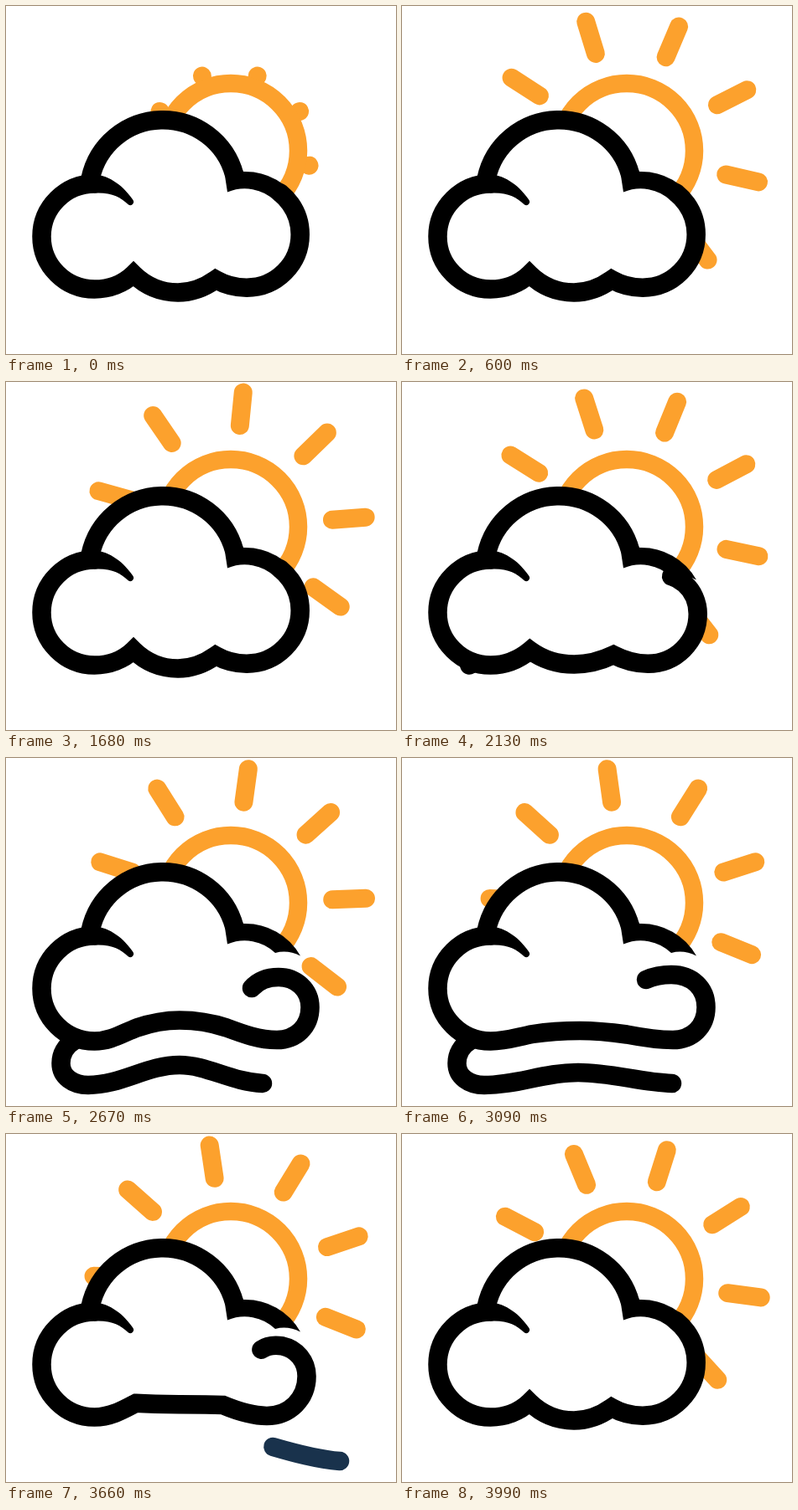
These frames come from a looping animation (465 by 416 pixels, 4.02 s). An HTML page:

```html
<!DOCTYPE html>
<html lang="en">
<head>
<meta charset="utf-8">
<title>Sun, cloud and wind</title>
<style>
html, body { margin: 0; height: 100%; overflow: hidden; background: #fff; }
svg { display: block; width: 465px; height: 416px; }
</style>
</head>
<body>
<svg viewBox="0 0 465 416" fill="none">
  <g stroke="#fca12d">
    <g id="rays" stroke-width="22" stroke-linecap="round"></g>
    <circle cx="268" cy="173" r="80.5" stroke-width="21.5"/>
  </g>
  <g fill="#fff">
    <circle cx="187" cy="224.5" r="88"/>
    <circle cx="287" cy="273" r="66"/>
    <path d="M150 250H300V360H150"/>
  </g>
  <path id="gust" pathLength="1" stroke-width="22.5" stroke-linecap="round"/>
  <path id="body" fill="#fff" stroke="#000" stroke-width="22.5" stroke-linecap="round" stroke-miterlimit="10"/>
  <path d="M100.7 206.2A88.2 88.2 0 0 1 272.2 201.7" stroke="#000" stroke-width="22.6"/>
  <g fill="#000">
    <path d="M264 222.5L261 203L281.5 195L283 198A75 75 0 0 1 351 236.5Q336 229 321 233A52.5 52.5 0 0 0 264 222.5"/>
    <path d="M105 201.2C124 202.5 141 216 151.5 232A4 4 0 0 1 146 237.5C136 228 126 222.5 105 223.5"/>
  </g>
</svg>
<script>
const LOOP = 4020;
const $ = id => document.getElementById(id);
const rays = $('rays'), body = $('body'), gust = $('gust');

// Lower outline of the cloud: puffy, wavy and nearly flat
const puffy = 'M327 223.4C331.6 227.1 335.8 231.6 339.2 236.5C346.7 247.1 350.7 260 350.7 273' +
  'C350.7 308.2 322.2 336.7 287 336.7C273 336.7 260.5 333 250 327' +
  'C236.7 336.5 221.3 342.5 205 342.5C185 342.5 166.4 334.5 152 320.5' +
  'C140 332 123 338.5 105.5 338.5';
const wavy = 'M293 275C301 266 312 262 325 262C346 262 362.5 277 362.5 298' +
  'C362.5 321 346 337 323 337C302 337 283 330 263 322.5' +
  'C245 316.5 230 313.5 207 313.5C187 313.5 172 317 156 322.5' +
  'C139 329 125 338.5 105.5 338.5';
const flat = 'M291 265C300 261 309 259 321 259C346 259 362.5 275 362.5 298' +
  'C362.5 321 346 337 323 337C304 337 286 334 268 330.5' +
  'C250 328 232 326 212 326C190 326 172 327.5 156 330' +
  'C139 333 125 338.5 105.5 338.5';
const leftPuff = 'A63 63 0 0 1 105.5 212.5';

// Gust of wind below the cloud
const hook = 'M81 338C71 344 65.5 354 65.5 365C65.5 381 80 391 98 391';
const gustWavy = hook + 'C138 391 168 367 207 367C240 367 268 387 306 389';
const gustFlat = hook + 'C138 391 168 376 210 376C250 376 285 388 322 389';
const gustLong = hook + 'C150 391 200 361 260 361C290 361 345 387 398 391';

const span = (t, a, b) => Math.min(1, Math.max(0, (t - a) / (b - a)));
const smooth = u => u * u * (3 - 2 * u);
const mix = (a, b, p) => {
  const ends = b.match(/[\d.]+/g);
  let i = 0;
  return a.replace(/[\d.]+/g, v => (+v + (ends[i++] - v) * p).toFixed(2));
};

for (let i = 0; i < 9; i++) {
  const ray = document.createElementNS('http://www.w3.org/2000/svg', 'path');
  ray.setAttribute('transform', `rotate(${i * 40})`);
  rays.append(ray);
}

function draw(t) {
  const grow = span(t, 0, 420);
  const angle = 10 + 160 * (t / LOOP) ** 2.1;
  rays.setAttribute('transform', `translate(266.8 174) rotate(${angle})`);
  for (const ray of rays.children)
    ray.setAttribute('d', `M${96 + 26.5 * grow} 0H${96.01 + 66.3 * grow}`);

  const wind = span(t, 2025, 2640) - span(t, 3510, 3960);
  const ripple = Math.sin(Math.PI * span(t, 2670, 3510)) ** 2;
  body.setAttribute('d', mix(puffy, mix(wavy, flat, ripple), wind) + leftPuff);

  const head = smooth(span(t, 2115, 2640));
  const tail = span(t, 3180, 3840) ** 0.75;
  const shade = span(t, 3300, 3660);
  gust.style.display = head > tail ? '' : 'none';
  gust.setAttribute('d', t < 3090
    ? mix(gustWavy, gustFlat, ripple)
    : mix(gustFlat, gustLong, smooth(span(t, 3090, 3660))));
  gust.setAttribute('stroke', `rgb(${25 * shade},${50 * shade},${76 * shade})`);
  gust.setAttribute('stroke-dasharray', `${Math.max(0, head - tail)} 2`);
  gust.setAttribute('stroke-dashoffset', -tail);
}

const start = performance.now();
function tick() {
  draw((performance.now() - start) % LOOP);
  requestAnimationFrame(tick);
}
draw(0);
requestAnimationFrame(tick);
</script>
</body>
</html>
```
